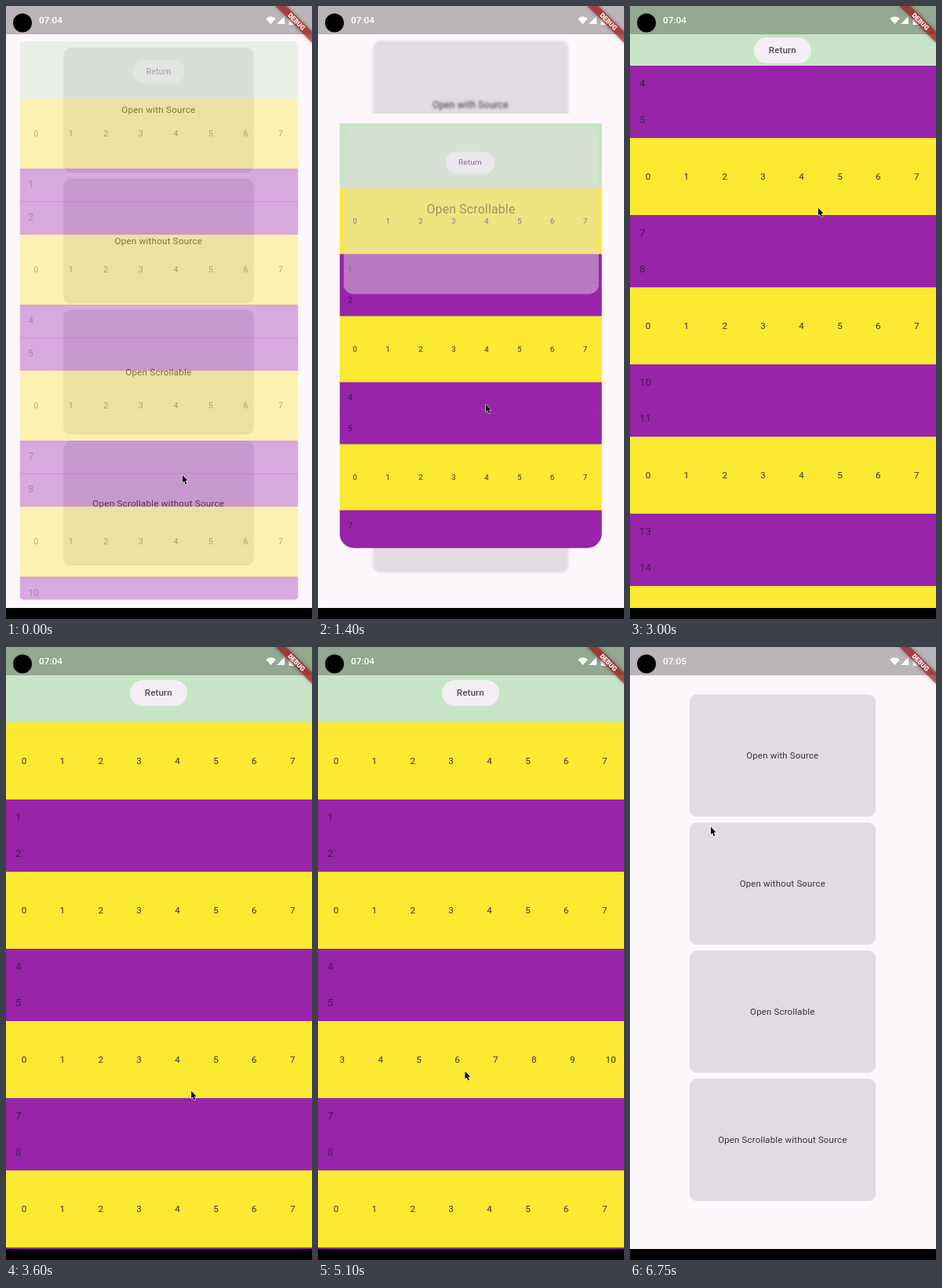
Write an HTML page with a canvas that moves like this. It is 390 px wide and 780 px high and loops after 6800 ms.

```html
<!DOCTYPE html>
<html lang="en">
<head>
<meta charset="utf-8">
<title>Card transitions</title>
<style>
html, body { margin: 0; width: 390px; height: 780px; overflow: hidden; background: #fdf7fc; }
canvas { display: block; }
</style>
</head>
<body>
<canvas id="stage" width="390" height="780"></canvas>
<script>
const c = document.getElementById('stage').getContext('2d');
const LOOP = 6800, STEP = 50, W = 390, H = 780;
const BG = '#fdf7fc', CARD = '#e2dce2', INK = '#37323a';
const GREEN = '#c8e4c6', YELLOW = '#fbe932', PURPLE = '#9824aa';
const LABELS = ['Open with Source', 'Open without Source', 'Open Scrollable', 'Open Scrollable without Source'];
const COL = 48.9, YELLOW_H = 98, TILE_H = 46;

// Each key is [time, value]; segments ease in and out.
const OPEN = [[-40, 0], [155, 1], [400, 1], [700, 0], [1150, 0], [1586, 1], [1800, 1], [2230, 0],
  [2400, 0], [2650, 1], [3750, 1], [4200, 0], [4550, 0], [4850, 1], [6050, 1], [6350, 0], [6750, -.3]];
const DRAG_X = [[1800, 0], [2200, 4], [2240, 0], [5900, 0], [6250, -10], [6400, 0]];
const DRAG_Y = [[0, -4], [155, 0], [350, 0], [700, 60], [750, 0], [1800, 0], [2000, 30], [2200, 1], [2240, 0],
  [3700, 0], [4200, 60], [4250, 0], [5900, 0], [6250, 91], [6400, 91]];
const SCROLL = [[2800, 0], [3000, 308], [3200, 308], [3600, 0]];
const SIDE = [[4950, 0], [5600, 21 * COL]];
const MOUSE_X = [[0, 225], [350, 210], [700, 222], [1100, 214], [1500, 214], [1800, 240], [2200, 268], [2400, 262],
  [2800, 248], [3000, 240], [3700, 236], [4500, 233], [4700, 240], [4950, 330], [5200, 110], [5350, 330],
  [5600, 110], [5850, 277], [6000, 275], [6250, 268], [6750, 103]];
const MOUSE_Y = [[0, 597], [350, 440], [700, 520], [1100, 507], [1500, 507], [1800, 460], [2200, 628], [2400, 628],
  [2800, 565], [3000, 257], [3200, 257], [3600, 565], [3750, 500], [4200, 627], [4600, 627], [4950, 540],
  [5600, 540], [5900, 453], [6250, 544], [6750, 229]];

const lerp = (a, b, p) => a + (b - a) * p;
const clamp = v => Math.max(0, Math.min(1, v));

function at(keys, t) {
  const i = keys.findIndex(k => k[0] > t);
  if (i < 0) return keys[keys.length - 1][1];
  if (i === 0) return keys[0][1];
  const [t0, a] = keys[i - 1], [t1, b] = keys[i], x = (t - t0) / (t1 - t0);
  return lerp(a, b, x * x * (3 - 2 * x));
}

function rect(x, y, w, h, color) {
  c.fillStyle = color;
  c.fillRect(x, y, w, h);
}

function round(x, y, w, h, r, color) {
  c.beginPath();
  c.roundRect(x, y, w, h, r);
  if (color) { c.fillStyle = color; c.fill(); }
}

function poly(points, color) {
  c.beginPath();
  points.forEach(p => c.lineTo(...p));
  c.closePath();
  c.fillStyle = color;
  c.fill();
}

function text(s, x, y, size = 11.6, color = INK, align = 'center', weight = 400, gap = .2) {
  c.font = `${weight} ${size}px Roboto, sans-serif`;
  c.letterSpacing = gap + 'px';
  c.textAlign = align;
  c.textBaseline = 'middle';
  c.fillStyle = color;
  c.fillText(s, x, y);
}

function home(open) {
  rect(0, 0, W, H, BG);
  c.save();
  const blur = 3 * clamp(open), s = 1 + .054 * open;
  if (blur > .1) c.filter = `blur(${blur}px)`;
  c.translate(194.5, 383);
  c.scale(s, s);
  c.translate(-194.5, -383);
  LABELS.forEach((label, i) => {
    const y = 55 + 165.7 * i;
    round(74, y, 241, 158, 9, CARD);
    text(label, 194.3, y + 79.5);
  });
  c.restore();
}

function page(scroll, side) {
  const head = Math.max(76, 96 - scroll);
  c.save();
  c.beginPath();
  c.rect(0, head, W, 900);
  c.clip();
  let y = 96 - scroll;
  for (let i = 0; y < 900; i++) {
    const wide = i % 3 === 0, h = wide ? YELLOW_H : TILE_H;
    if (y + h > 0) {
      rect(0, y, W, h + .5, wide ? YELLOW : PURPLE);
      if (wide) {
        const offset = i === 6 ? side : 0, first = Math.floor(offset / COL);
        for (let n = first; n < first + 9; n++) text(n, 23 + COL * n - offset, y + 49.5);
      } else text(i, 12, y + 23, 13.1, 'rgba(30,18,36,.65)', 'left', 400, .4);
    }
    y += h;
  }
  c.restore();
  rect(0, 0, W, head, GREEN);
  const by = 56 + (head - 76) / 10;
  round(158, by - 16, 73, 33, 16.5, '#f4eef5');
  text('Return', 194.3, by + .5, 11.6, '#51485c', 'center', 500, .1);
}

function fadePage(open, dx, dy, scroll, side) {
  const s = .9 + .1 * open, inset = (1 - s) * 183;
  c.save();
  c.globalAlpha = clamp(open * 3.4);
  c.translate(195 + dx, 383 + dy);
  c.scale(s, s);
  c.translate(-195, -383);
  round(0, inset, W, H, 60 * (1 - s));
  c.clip();
  page(scroll, side);
  c.restore();
}

function growPage(open, dx, dy) {
  const x = lerp(70, 0, open) + dx, y = lerp(382, 0, open) + dy;
  const w = lerp(248, W, open), h = lerp(167, H, open);
  const top = 14 * clamp(1 - open / .6), bottom = open < .8 ? 19 : 19 * (1 - open) * 5;
  rect(x, y - 20 * open, w, 20 * open, BG);
  c.save();
  round(x, y, w, h, [top, top, bottom, bottom]);
  c.clip();
  c.translate(x, y);
  c.save();
  c.scale(w / W, w / W);
  page(0, 0);
  c.restore();
  c.scale(w / 248, w / 248);
  c.globalAlpha = clamp(1 - .9 * open);
  round(4, 3, 241, 158, 9, CARD);
  text(LABELS[2], 124.3, 82);
  c.restore();
}

function statusBar(t) {
  rect(0, 0, W, 36, 'rgba(0,0,0,.265)');
  c.beginPath();
  c.arc(21, 21.5, 12, 0, 7);
  c.fillStyle = '#000';
  c.fill();
  text(t < 5300 ? '07:04' : '07:05', 42, 18.5, 11.8, '#fff', 'left', 500, 0);
  c.beginPath();
  c.moveTo(337.5, 23);
  c.arc(337.5, 23, 9.5, -2.3, -.84);
  c.fillStyle = '#fff';
  c.fill();
  poly([[345, 23], [355, 13], [355, 23]], '#fff');
  round(360.5, 13, 7, 11, 1, '#fff');
  rect(362.5, 11.5, 3, 2, '#fff');
  c.save();
  c.translate(W, 0);
  c.rotate(Math.PI / 4);
  c.shadowColor = 'rgba(0,0,0,.5)';
  c.shadowBlur = 5;
  rect(-33, 23, 66, 10, 'rgba(183,28,28,.63)');
  c.shadowBlur = 0;
  text('DEBUG', 0, 28.3, 8.4, '#fff', 'center', 900, 0);
  c.restore();
}

function pointer(x, y) {
  c.save();
  c.translate(x, y);
  c.lineWidth = 1.2;
  c.lineJoin = 'round';
  c.strokeStyle = 'rgba(255,255,255,.8)';
  poly([[0, 0], [0, 9.5], [2.1, 7.6], [3.8, 11.4], [5.3, 10.7], [3.6, 7], [6.4, 6.8]], '#000');
  c.stroke();
  c.fill();
  c.restore();
}

function draw(t) {
  const open = at(OPEN, t), dx = at(DRAG_X, t), dy = at(DRAG_Y, t);
  home(open);
  if (open > 0) {
    if (t > 1100 && t < 2300) growPage(open, dx, dy);
    else fadePage(open, dx, dy, at(SCROLL, t), at(SIDE, t));
  }
  statusBar(t);
  rect(0, 766, W, 14, '#000');
  pointer(at(MOUSE_X, t), at(MOUSE_Y, t));
}

const start = performance.now();
function tick() {
  const t = (performance.now() - start) % LOOP;
  draw(Math.floor(t / STEP) * STEP);
  requestAnimationFrame(tick);
}
tick();
</script>
</body>
</html>
```
